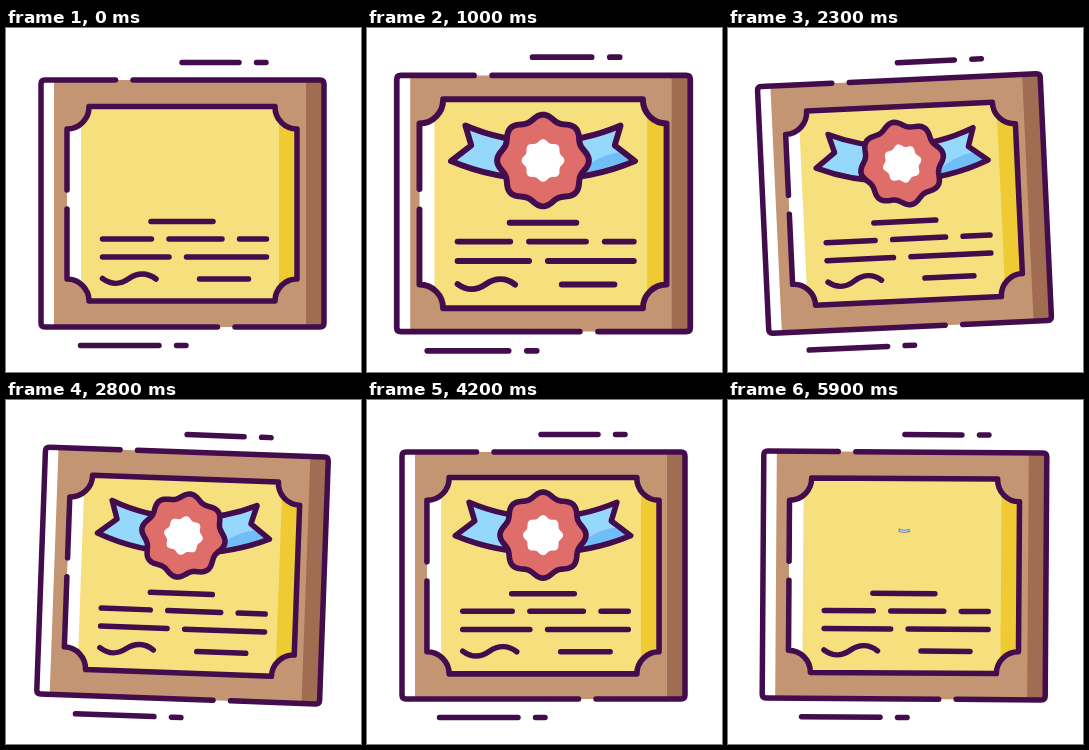
Animation, 355 px wide and 344 px high, one loop 6 s. Source, as an HTML page:

```html
<!DOCTYPE html>
<html lang="en">
<head>
<meta charset="utf-8">
<title>Certificate</title>
<style>
  html, body { margin: 0; width: 100%; height: 100%; overflow: hidden; background: #fff; }
  svg { display: block; }
  .ink { fill: none; stroke: #420c4d; stroke-width: 5.5; stroke-linecap: round; stroke-linejoin: round; }
</style>
</head>
<body>
<svg width="355" height="344" viewBox="0 0 355 344">
  <defs>
    <clipPath id="paperClip"><path id="paperShape" d="M83 78.5H269A22 22 0 0 0 291 101V251A22 22 0 0 0 269 273H83A22 22 0 0 0 61 251V101A22 22 0 0 0 83 78.5Z"/></clipPath>
    <clipPath id="ribbonClip"><path id="ribbonShape" d="M103.500 103Q138 118 176 118T248.500 103L243 121.500L262 136Q222 153 176 153T90 136L109 121.500Z"/></clipPath>
  </defs>
  <g id="all">
    <g id="frame">
      <rect x="35" y="52" width="283" height="247" rx="4" fill="#c39573"/>
      <path d="M39 52H48V299H39Q35 299 35 295V56Q35 52 39 52Z" fill="#fff"/>
      <path d="M300 52H314Q318 52 318 56V295Q318 299 314 299H300Z" fill="#a06c52"/>
      <path class="ink" d="M109.500 52H39Q35 52 35 56V295Q35 299 39 299H211.500M229 299H314Q318 299 318 295V56Q318 52 314 52H127"/>
      <path id="dashes" class="ink" d="M176 34.500H233M250.500 34.500H260M74.500 317.500H153M170.500 317.500H180"/>
    </g>
    <g id="paper">
      <g clip-path="url(#paperClip)">
        <path d="M55 70H300V280H55Z" fill="#f6e07d"/>
        <path d="M55 70H75V280H55Z" fill="#fff"/>
        <path d="M273 70H300V280H273Z" fill="#eecb32"/>
      </g>
      <path class="ink" d="M61 162V101A22 22 0 0 0 83 78.500H269A22 22 0 0 0 291 101V251A22 22 0 0 0 269 273H83A22 22 0 0 0 61 251V181"/>
      <path class="ink" d="M145 193.500H207M96.500 211H145.500M163 211H216M233.500 211H260.500M96.500 229H163M180.500 229H260.500M193.500 251H242.500M96.500 250.500C107 258 115 256 123 250.500S141 244 150 251"/>
      <g id="ribbon">
        <use href="#ribbonShape" fill="#95d8fb"/>
        <path d="M205 152Q222 132 246 128L264 136L215 160Z" fill="#70bdf7" clip-path="url(#ribbonClip)"/>
        <use href="#ribbonShape" class="ink"/>
      </g>
      <g id="medal">
        <path id="rosette" class="ink" style="fill:#df6e6b"/>
        <path id="core" fill="#fff"/>
      </g>
    </g>
  </g>
</svg>
<script>
const LOOP = 6000, CYCLE = 3000;
const $ = id => document.getElementById(id);
const set = (id, transform) => $(id).setAttribute('transform', transform);
const clamp = x => Math.min(1, Math.max(0, x));
const ease = (t, from, to) => (1 - Math.cos(Math.PI * clamp((t - from) / (to - from)))) / 2;
const bump = (t, start, peak, end) => t < peak ? ease(t, start, peak) : 1 - ease(t, peak, end);
const about = (x, y, op) => `translate(${x} ${y}) ${op} translate(${-x} ${-y})`;

function scallop(radius, depth) {
  const points = [];
  for (let i = 0; i < 160; i++) {
    const a = i * Math.PI / 80, r = radius + depth * Math.cos(8 * a);
    points.push((r * Math.sin(a)).toFixed(2) + ' ' + (-r * Math.cos(a)).toFixed(2));
  }
  return 'M' + points.join('L') + 'Z';
}
$('rosette').setAttribute('d', scallop(39.6, 2.5));
$('core').setAttribute('d', scallop(18.2, 1.4));

function draw(time) {
  const t = time % LOOP, c = t % CYCLE;
  const frame = 1 + 0.2 * bump(c, 0, 583, 1167);
  const paper = 1 + 0.2 * bump(c, 0, 583, 1300);
  const medal = 1 + 0.2 * bump(c, 0, 583, 1367);
  const ribbon = 1 + 0.2 * bump(c, 0, 413, 1400);
  const swing = 4.5 * (ease(c, 1267, 1717) - 2 * ease(c, 1717, 2167)
    + 2 * ease(c, 2167, 2617) - ease(c, 2617, 2967));
  const ribbonShow = bump(t, 0, 500, 500) && ease(t, 0, 500) * (1 - ease(t, 5500, 5983));
  const ribbonSize = ease(t, 0, 500) * (1 - ease(t, 5500, 5983));
  const medalSize = ease(t, 150, 650) * (1 - ease(t, 5350, 5800));

  set('all', about(176, 176, `rotate(${swing})`));
  set('frame', about(176, 176, `scale(${frame})`));
  set('dashes', `translate(${-17 * bump(c, 150, 740, 1333)} 0)`);
  set('paper', about(176, 176, `scale(${paper})`));
  set('ribbon', about(176, 131, `scale(${ribbonSize * ribbon / paper} ${ribbonSize})`));
  set('medal', `translate(176 135.5) rotate(${4 * swing}) scale(${medalSize * medal / paper})`);
}

const began = performance.now();
(function tick() {
  draw(performance.now() - began);
  requestAnimationFrame(tick);
})();
</script>
</body>
</html>
```
